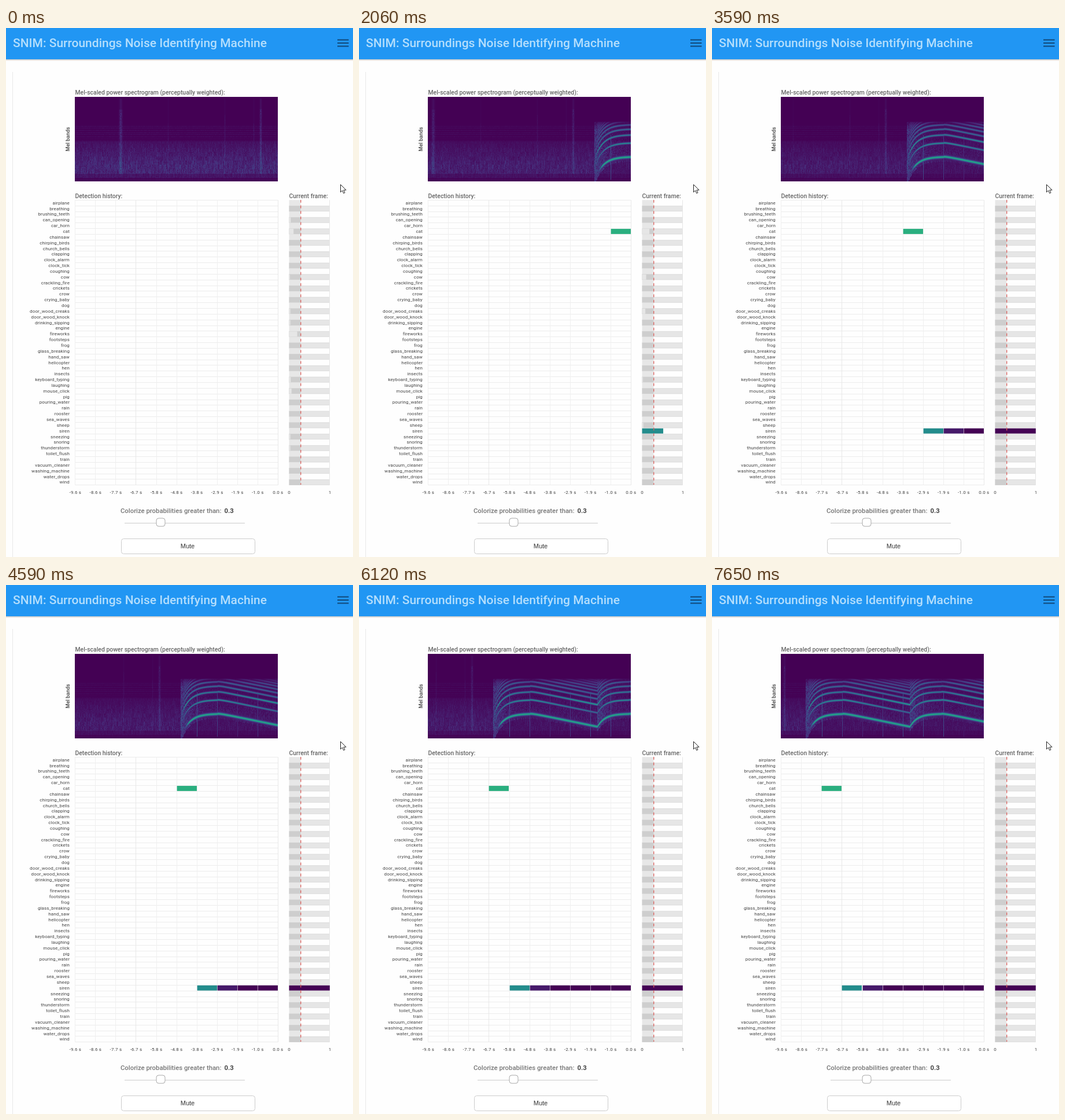
Animation of 600 by 914 pixels, one loop 8 s. Source, as an HTML page with a canvas:

```html
<!DOCTYPE html>
<html lang="en">
<head>
<meta charset="utf-8">
<title>Sound detection</title>
<style>
  html, body { margin: 0; width: 100%; height: 100%; overflow: hidden; background: #fefefe; }
  svg, canvas { position: absolute; display: block; }
  svg { left: 0; top: 0; font-family: Roboto, "Noto Sans", sans-serif; }
  canvas { left: 119px; top: 119px; }
  .title { font-size: 21px; font-weight: 500; fill: #b4defc; }
  .head { font-size: 10.4px; font-weight: 500; fill: #666; }
  .axis { font-size: 9px; font-weight: 500; fill: #444; text-anchor: middle; }
  .label { font-size: 8px; letter-spacing: .13px; fill: #444; text-anchor: end; }
  .tick { font-size: 8px; letter-spacing: .2px; fill: #444; text-anchor: middle; }
  .slider { font-size: 11.3px; font-weight: 500; fill: #777; }
  .slider tspan { font-weight: 700; fill: #444; }
  .mute { font: 11px "Liberation Sans", Arial, sans-serif; fill: #333; text-anchor: middle; }
</style>
</head>
<body>
<svg id="stage" width="600" height="914" viewBox="0 0 600 914">
  <defs>
    <linearGradient id="shade" x2="0" y2="1">
      <stop stop-color="#000" stop-opacity=".32"/>
      <stop offset="1" stop-color="#000" stop-opacity="0"/>
    </linearGradient>
  </defs>
  <rect y="53" width="600" height="4" fill="url(#shade)"/>
  <rect width="600" height="54" fill="#2196f3"/>
  <text class="title" x="12" y="33">SNIM: Surroundings Noise Identifying Machine</text>
  <path d="M573 20.5h19.5m-19.5 5.5h19.5m-19.5 5.5h19.5" stroke="#11497a" stroke-width="2"/>
  <path d="M11.5 76V914" stroke="#e9e9e9"/>
  <text class="head" x="119.5" y="115">Mel-scaled power spectrogram (perceptually weighted):</text>
  <text class="axis" transform="translate(110 192) rotate(-90)">Mel bands</text>
  <text class="head" x="119.5" y="293.5">Detection history:</text>
  <text class="head" x="489.5" y="293.5">Current frame:</text>
  <g id="grid"></g>
  <g id="cells"></g>
  <g id="bars"></g>
  <path d="M509.7 297V789" stroke="#d9605c" stroke-width="1.3" stroke-dasharray="4.8"/>
  <text class="slider" x="198" y="837.5">Colorize probabilities greater than: <tspan x="377.5">0.3</tspan></text>
  <path d="M205 855.5H413" stroke="#ccc"/>
  <rect x="260" y="847" width="15" height="14" rx="4" fill="#fff" stroke="#a9a9a9"/>
  <rect x="199.5" y="882.5" width="231" height="26" rx="4" fill="#fff" stroke="#ccc"/>
  <text class="mute" x="314" y="898.5">Mute</text>
  <path d="M578.5 270.5v13.2l3.1-2.9 2.1 4.8 2.2-1-2.1-4.6h4.3z" fill="#fff" stroke="#222"/>
</svg>
<canvas id="spec" width="351" height="146"></canvas>
<script>
const LOOP = 8000, TOP = 297.3, ROW = 9.85, LEFT = 119.82, CELL = 35.05;
const CUR = 489.5, CUR_W = 70.3, LIMIT = 0.3, CAT = 5, SIREN = 40;
const NAMES = ("airplane breathing brushing_teeth can_opening car_horn cat chainsaw chirping_birds " +
  "church_bells clapping clock_alarm clock_tick coughing cow crackling_fire crickets crow crying_baby " +
  "dog door_wood_creaks door_wood_knock drinking_sipping engine fireworks footsteps frog glass_breaking " +
  "hand_saw helicopter hen insects keyboard_typing laughing mouse_click pig pouring_water rain rooster " +
  "sea_waves sheep siren sneezing snoring thunderstorm toilet_flush train vacuum_cleaner " +
  "washing_machine water_drops wind").split(" ");

// Times at which each part advances by one chunk
const SPEC_AT = [1030, 2060, 3090, 3590, 4090, 5090, 5620, 6620, 7650];
const HIST_AT = [1530, 2590, 3090, 3590, 4590, 5090, 6120, 7120];
const HITS = [[CAT, 0.37], [SIREN, 0.52], [SIREN, 0.93], [SIREN, 1]];
const BARS = [
  [0, { 3: .04, 5: .11, 13: .02, 19: .03, 21: .03, 23: .2, 31: .04, 33: .06, 41: .03, 43: .03 }],
  [1030, { 5: .38, 13: .03, 19: .03, 31: .02, 41: .02 }],
  [2060, { 5: .18, 13: .1, 19: .08, 31: .02, 39: .03, 40: .52 }],
  [3090, { 40: .93 }],
  [3590, { 40: 1 }]
];

const $ = id => document.getElementById(id);
const clamp = (v, a, b) => Math.min(b, Math.max(a, v));
const passed = (list, t) => list.filter(s => s <= t).length;
const rowY = i => TOP + i * ROW;
const rect = (x, y, w, h, fill) =>
  `<rect x="${x}" y="${y}" width="${w}" height="${h}" fill="${fill}"/>`;
const line = (d, color) => `<path d="${d}" stroke="${color}"/>`;

const STOPS = [[68, 1, 84], [71, 45, 123], [59, 82, 139], [44, 114, 142], [33, 145, 140],
  [40, 174, 128], [94, 201, 98], [173, 220, 48], [253, 231, 37]];
function viridis(v) {
  const p = clamp(v, 0, 1) * 8, i = Math.min(7, Math.floor(p));
  return STOPS[i].map((c, n) => Math.round(c + (STOPS[i + 1][n] - c) * (p - i)));
}
const LUT = Array.from({ length: 256 }, (_, i) => viridis(i / 255));
const heat = p => `rgb(${viridis(1 - p)})`;

function drawGrid() {
  const bottom = rowY(50);
  let s = "";
  for (let i = 0; i <= 50; i++) {
    const y = Math.floor(rowY(i)) + 0.5;
    s += line(`M119 ${y}H470`, "#ececec");
  }
  for (let i = 0; i <= 10; i++) {
    const x = Math.floor(LEFT + i * CELL) + 0.5;
    s += line(`M${x} ${TOP}V${bottom}`, i === 3 || i === 10 ? "#e8e8e8" : "#f0f0f0");
    const sec = ((10 - i) * 0.96).toFixed(1);
    s += `<text class="tick" x="${LEFT + i * CELL}" y="805">${i < 10 ? "-" : ""}${sec} s</text>`;
  }
  NAMES.forEach((name, i) => {
    const y = rowY(i);
    s += `<text class="label" x="110" y="${y + 7.4}">${name}</text>`;
    if (i % 2) {
      s += rect(CUR, y, CUR_W, ROW, "#e6e6e6");
      s += line(`M${CUR} ${y + .5}h${CUR_W}m0 ${ROW - 1}h-${CUR_W}`, "#dedede");
    }
    s += rect(CUR, y, 20, ROW, i % 2 ? "#cecece" : "#e7e7e7");
  });
  s += line(`M559.5 ${TOP}V${bottom}`, "#e6e6e6");
  s += `<text class="tick" x="489.5" y="805">0</text><text class="tick" x="560" y="805">1</text>`;
  $("grid").innerHTML = s;
}

function drawCells(count) {
  let s = "";
  for (let i = 0; i < count; i++) {
    const [row, p] = HITS[Math.min(i, 3)];
    const x = Math.floor(LEFT + (10 - count + i) * CELL) + 0.6;
    s += rect(x, rowY(row) + 0.5, CELL - 0.7, ROW - 1, heat(p));
  }
  $("cells").innerHTML = s;
}

function drawBars(values) {
  $("bars").innerHTML = Object.entries(values).map(([row, p]) =>
    rect(CUR, rowY(+row) + 0.5, p * CUR_W, ROW - 1, p < LIMIT ? "#e6e6e6" : heat(p))).join("");
}

function hash(a, b) {
  let h = Math.imul(a + 101, 374761393) ^ Math.imul(b + 57, 668265263);
  h = Math.imul(h ^ (h >>> 13), 1274126177);
  return ((h ^ (h >>> 16)) >>> 0) / 4294967296;
}
const bell = (d, w) => Math.exp(-d * d / (2 * w * w));

// Siren pitch as a height in the picture; u is the position along the recording
const START = 477, DIP = 657, PEAKS = [540, 711];
const fall = d => 0.205 * (Math.sqrt(d * d + 64) - 8);
function pitch(u) {
  const second = u >= DIP, peak = PEAKS[second ? 1 : 0];
  if (u > peak) return 222 + fall(u - peak);
  return second ? 222 + 22 * Math.exp((DIP - u) / 13) : 222 + 27 * Math.exp((483 - u) / 14);
}

function noiseLevel(y) {
  if (y < 168) return 0;
  if (y < 196) return 0.018;
  if (y < 236) return 0.05 + 0.08 * (y - 196) / 40;
  return y < 252 ? 0.13 : y < 259 ? 0.07 : 0.015;
}

// Short noises before the siren: position, width, strength, top
const CLICKS = [[198, 1.7, .14, 141], [440, 1.2, .13, 140], [378, .7, .05, 150],
  [280, .6, .04, 165], [428, .6, .05, 165]];

function column(u, gain, put) {
  const c = Math.floor(u), siren = u >= START;
  const base = pitch(u), drop = clamp((base - 222) / 22, 0, 1);
  const since = u - (u >= DIP ? DIP : START);
  const chunk = Math.floor((u - 119) / CELL), edge = u - 119 - chunk * CELL;
  const tick = u > 495 && edge < 1 ? 0.05 + 0.18 * hash(chunk, 7) : 0;
  for (let r = 0; r < 146; r++) {
    const y = r + 119, band = Math.floor(r / 1.825);
    const n = hash(c, band), streak = hash(c, 500 + Math.floor(band / 4));
    const level = noiseLevel(y);
    let v = y < 196 ? level * (band % 2) * (0.6 + n)
      : level * (0.35 + 0.5 * n + 0.6 * streak * streak);
    v *= siren ? gain * 0.65 : gain;
    for (const [x, w, a, top] of CLICKS) {
      if (Math.abs(u - x) < 6 && y > 121 && y < 252)
        v += bell(u - x, w) * a * gain * (y < top ? 0.3 : 0.4 + 0.6 * n);
    }
    if (siren) {
      if (y > 161 && y < base + 8) {
        v += 0.04 * n + 0.17 * Math.exp(-since / 18) * (0.35 + 0.65 * n) * clamp((y - 161) / 14, 0, 1);
        let tone = 0;
        for (let k = 1; k < 13; k++) {
          const d = y - (base - 34.6 * Math.log(k));
          if (Math.abs(d) > 14) continue;
          const amp = k === 1 ? 0.5 : k === 2 ? 0.4 - 0.12 * drop
            : k === 3 ? 0.34 + 0.12 * drop : Math.max(0.14, 0.42 - 0.033 * k);
          const on = k === 1 ? clamp((u - 482) / 9, 0, 1) : clamp((u - 475) / 9, 0.2, 1);
          const edgeFade = clamp((y - 159) / 10, 0.3, 1);
          tone = Math.max(tone, on * edgeFade * amp *
            (bell(d, k === 1 ? 1.4 : 1) + 0.15 * bell(d, k === 1 ? 5 : 3)));
        }
        v = Math.max(v, tone + 0.25 * v);
      }
      if (y > 184 && y < 262) v = Math.max(v, tick);
    }
    put(r, v);
  }
}

const ctx = $("spec").getContext("2d");
function drawSpec(shift) {
  const img = ctx.createImageData(351, 146);
  const gain = shift < 1 ? 1 : shift < 3 ? 0.8 : 0.7;
  for (let x = 0; x < 351; x++) {
    column(119 + x + Math.round(shift * CELL), gain, (r, v) => {
      const i = (r * 351 + x) * 4;
      img.data.set(LUT[Math.round(clamp(v, 0, 1) * 255)], i);
      img.data[i + 3] = 255;
    });
  }
  ctx.putImageData(img, 0, 0);
}

const shown = {};
function update(key, value, draw) {
  if (shown[key] === value) return;
  shown[key] = value;
  draw(value);
}

function render(t) {
  update("spec", passed(SPEC_AT, t), drawSpec);
  update("hist", passed(HIST_AT, t), drawCells);
  update("bars", BARS.filter(b => b[0] <= t).pop()[1], drawBars);
}

drawGrid();
const begin = performance.now();
function tick() {
  render((performance.now() - begin) % LOOP);
  requestAnimationFrame(tick);
}
tick();
</script>
</body>
</html>
```
